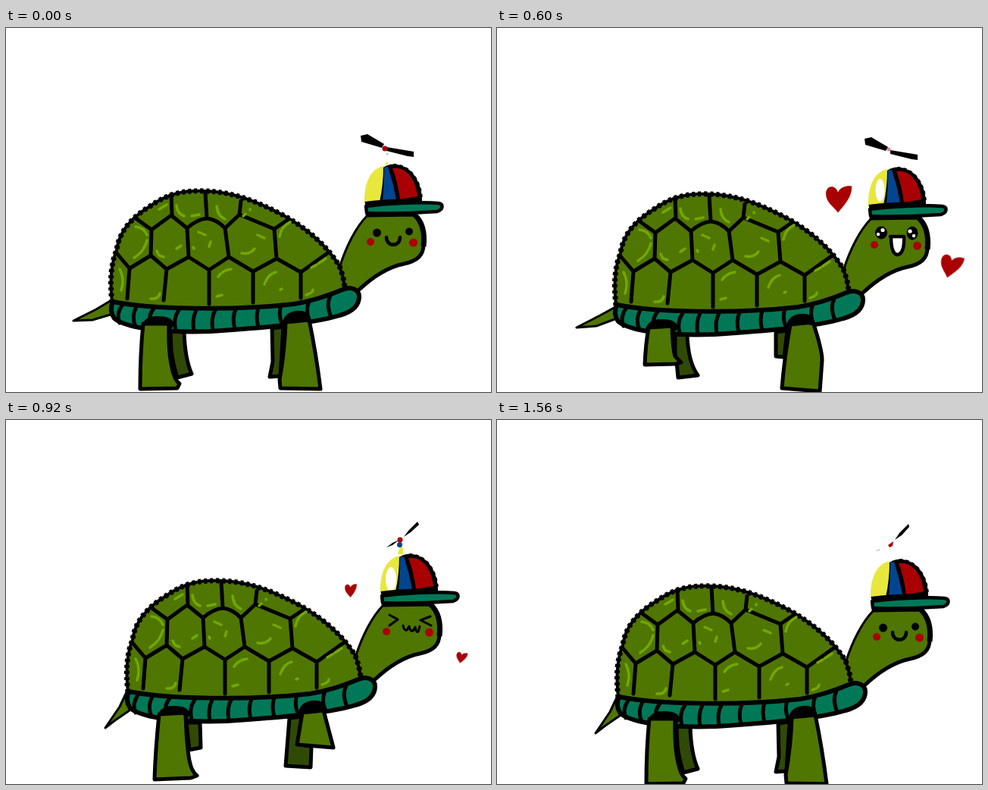
Animation of 640 by 480 pixels, one loop 1600 ms. Source, as an HTML page:

```html
<!DOCTYPE html>
<html lang="en">
<head>
<meta charset="utf-8">
<title>Walking turtle</title>
<style>
  html, body { margin: 0; width: 100%; height: 100%; overflow: hidden; background: #fff; }
  svg { display: block; width: 640px; height: 480px; }

  .skin { fill: #4f7600; }
  .far { fill: #304a06; }
  .teal { fill: #007857; }
  .yellow { fill: #e7e73c; }
  .blue { fill: #004590; }
  .red { fill: #a90004; }
  .white { fill: #fff; }
  .ink { stroke: #000; stroke-width: 5; stroke-linejoin: round; stroke-linecap: round; }
  .thin { stroke-width: 3; }
  .line { fill: none; }
  .jag { fill: none; stroke: #000; stroke-width: 7; stroke-dasharray: 4 4; }
  .shine { fill: none; stroke: #73a800; stroke-width: 3.5; stroke-linecap: round; stroke-linejoin: round; }

  /* Held poses: every part jumps, nothing eases */
  .body, .rest, .lift, .stride, .first, .glance, .wince, .last, .happy, .flat, .across, .stem {
    animation: 1600ms step-end infinite;
  }
  .rest, .lift, .stride, .first, .glance, .wince, .last, .flat, .across { visibility: hidden; }

  .body { animation-name: walk; }
  .rest { animation-name: rest; }
  .lift { animation-name: lift; }
  .stride { animation-name: stride; }
  .first { animation-name: first; }
  .glance { animation-name: glance; }
  .wince { animation-name: wince; }
  .last { animation-name: last; }
  .flat { animation-name: flat; }
  .across { animation-name: across; }

  @keyframes walk {
    0%, 100% { transform: translate(0, 0); }
    17.5% { transform: translate(8px, -1px); }
    37.5% { transform: translate(17px, 4px); }
    57.5% { transform: translate(21px, -3px); }
    77.5% { transform: translate(17px, 3px); }
    97.5% { transform: translate(20px, 4px); }
  }
  @keyframes rest { 0%, 97.5%, 100% { visibility: visible; } 17.5% { visibility: hidden; } }
  @keyframes lift { 0%, 37.5%, 77.5%, 100% { visibility: hidden; } 17.5%, 57.5% { visibility: visible; } }
  @keyframes stride { 0%, 57.5%, 97.5%, 100% { visibility: hidden; } 37.5%, 77.5% { visibility: visible; } }
  @keyframes first { 0% { visibility: visible; } 17.5%, 100% { visibility: hidden; } }
  @keyframes glance { 0%, 37.5%, 100% { visibility: hidden; } 17.5% { visibility: visible; } }
  @keyframes wince { 0%, 77.5%, 100% { visibility: hidden; } 57.5% { visibility: visible; } }
  @keyframes last { 0%, 100% { visibility: hidden; } 97.5% { visibility: visible; } }
  @keyframes flat { 0%, 37.5%, 77.5% { visibility: visible; } 17.5%, 57.5%, 97.5%, 100% { visibility: hidden; } }
  @keyframes across { 0%, 37.5%, 77.5%, 100% { visibility: hidden; } 17.5%, 57.5%, 97.5% { visibility: visible; } }
</style>
</head>
<body>
<svg viewBox="0 0 640 480">
  <defs>
    <path id="heart" d="M-1 18C-7 10-17 4-17-7C-17-18-5-20-1-9C3-17 12-18 17-17C18-4 9 6-1 18Z"/>
    <path id="shell" d="M140 362C137 335 138 312 146 293C149 268 167 249 190 235C214 218 235 214 262 215C300 216 332 229 366 247C402 267 427 292 440 314C444 325 447 335 447 347"/>
  </defs>

  <g class="body">
    <!-- Tail -->
    <path class="first skin ink thin" d="M139 359L119 371L89 386L114 385L141 377Z"/>
    <path class="stride skin ink thin" d="M139 364L119 375L88 391L114 389L141 379Z"/>
    <g class="across"><path class="skin ink thin" d="M139 360L129 381L110 409L123 399L142 386Z"/></g>

    <!-- Far legs -->
    <g class="rest far ink">
      <path d="M217 400L235 400Q236 436 245 456L226 461Q220 442 218 425Z"/>
      <path d="M351 396L366 394L362 459L348 460L352 440Z"/>
    </g>
    <g class="lift far ink">
      <path d="M217 402L235 402L236 435L221 438Z"/>
      <path d="M353 396L371 394L372 432L382 433L381 461L348 459Z"/>
    </g>
    <g class="stride far ink">
      <path d="M218 400L234 400Q235 436 248 454L222 457Q221 442 218 425Z"/>
      <path d="M351 397L366 395L362 430L351 429Z"/>
    </g>

    <!-- Neck and head -->
    <path class="skin" d="M441 313C449 288 462 262 477 247L540 246C549 255 553 270 551 285C551 300 543 307 525 311C505 315 485 327 465 346L446 347Z"/>
    <path class="ink line thin" d="M441 313C449 288 462 262 477 247"/>
    <path class="ink line" d="M477 247L540 246C549 255 553 270 551 285C551 300 543 307 525 311C505 315 485 327 465 346"/>
    <path class="line" stroke="#000" stroke-width="7" d="M539 246C549 255 553 270 551 288"/>

    <!-- Shell -->
    <use href="#shell" class="skin"/>
    <path class="skin" d="M140 361L447 346Q410 370 268 371Q180 370 140 361Z"/>
    <use href="#shell" class="ink line" style="stroke-width:4"/>
    <use href="#shell" class="jag"/>
    <path class="ink line" d="M218 219L219 247M263 217L265 251M310 228L308 246
      M170 250L192 266L218 247L239 264Q252 252 266 251Q279 253 289 264L308 246L354 265L373 252
      M192 266L191 300M239 264L241 302M289 264L294 302M354 265L357 304
      M146 297L163 317L191 300L212 318L241 302L268 319L294 302L326 321L357 304L389 322L424 297
      M163 317L160 357M212 318L208 359M268 319L268 364M326 321L326 362M389 322L389 356"/>
    <path class="shine" d="M171 262Q182 263 186 273M186 280Q183 294 169 303M150 318Q157 331 152 346M191 357Q201 358 203 350
      M212 233L202 239M225 234Q226 245 235 248M245 248L255 246M278 235Q279 248 289 252M313 248L316 245M322 239L322 240
      M375 256Q363 262 361 275M254 269L263 273M270 282L268 288M231 287L225 291M199 294L202 300L208 302
      M247 289L248 291M280 328Q286 319 297 318M278 354L285 352M311 297Q322 299 328 291
      M396 352Q405 349 405 345M403 316L410 312M413 310L422 304M332 273L341 277M362 345L364 344"/>
    <path class="shine" stroke-width="5" d="M341 338Q346 324 356 322"/>

    <!-- Rim -->
    <path class="teal ink" style="stroke-width:6" d="M141 361C190 371 300 373 380 364C410 359 430 351 444 345C455 340 466 345 466 354C466 368 455 375 440 379C400 391 330 396 270 400C215 402 160 397 143 383C138 376 138 368 141 361Z"/>
    <path class="ink line" d="M153 366Q145 377 150 389M172 368Q165 380 171 394M195 370Q188 378 190 388M228 372Q220 383 224 399
      M251 372Q245 384 248 400M276 372Q270 383 273 399M303 371Q298 382 302 397M333 369Q329 381 333 394M363 366Q359 377 364 390
      M400 361Q395 370 400 386M428 353Q422 365 429 381"/>

    <!-- Near legs -->
    <g class="rest skin ink">
      <path d="M181 390L215 390Q214 428 219 448Q222 464 229 469L226 475L177 476Q177 430 181 390Z"/>
      <path d="M369 388L400 385Q409 428 415 476L362 475L361 464Q368 425 369 388Z"/>
    </g>
    <g class="lift skin ink">
      <path d="M181 391L216 389Q217 430 221 452Q224 467 231 472L223 475L175 477Q176 440 181 391Z"/>
      <path d="M370 389L398 386L411 435L363 431Z"/>
    </g>
    <g class="stride skin ink">
      <path d="M183 391L214 389Q215 420 218 429L226 437L218 439L178 440Q179 414 183 391Z"/>
      <path d="M370 387L400 384Q412 420 412 434L409 475L359 471Q362 432 370 387Z"/>
    </g>
    <path d="M178 396Q181 380 199 380Q219 379 222 391L218 397L211 391Q198 387 185 391Z"/>
    <path d="M364 392Q366 375 383 373Q401 371 403 387L397 388Q384 383 371 389Z"/>

    <!-- Face -->
    <g class="red"><circle cx="481" cy="282" r="5"/><circle cx="537.5" cy="283" r="5.5"/></g>
    <g class="rest">
      <circle cx="489.500" cy="270" r="5.500"/><circle cx="532" cy="268.500" r="5"/>
      <path class="ink line" style="stroke-width:4.500" d="M502 276C502 289 520 289 520 276"/>
    </g>
    <g class="glance">
      <ellipse cx="489.500" cy="266" rx="6" ry="9"/><ellipse cx="532" cy="266" rx="6" ry="8"/>
      <path d="M500 275Q501 269 511 270Q522 269 522 274Q522 288 511 288Q502 287 500 275Z"/>
      <g class="white">
        <circle cx="491" cy="263" r="2.500"/><circle cx="488" cy="270" r="2"/>
        <circle cx="530" cy="263" r="2.500"/><circle cx="533" cy="269" r="2"/>
        <path d="M505 275L517 274Q517 283 511 283Q505 282 505 275Z"/>
      </g>
    </g>
    <g class="stride">
      <ellipse cx="490" cy="266" rx="8" ry="8.500"/><ellipse cx="531" cy="266.500" rx="7.500" ry="9"/>
      <path class="white ink" style="stroke-width:4.500" d="M502 271L520 271Q521 294 511 295Q503 293 503 272Z"/>
      <g class="white">
        <circle cx="492" cy="262.500" r="2.600"/><circle cx="486" cy="268" r="2.200"/>
        <circle cx="528" cy="264" r="2.600"/><circle cx="533" cy="270" r="2.200"/>
      </g>
    </g>
    <path class="wince ink line thin" d="M485 260L496 266L485 274M539 262L526 267L540 274
      M503 274Q504 281 508 280L511 275Q512 282 516 281L519 276Q520 284 523 282L525 275"/>

    <!-- Cap -->
    <path d="M474 231L490 192Q497 182 507 180C532 177 549 200 549 228L514 232Z"/>
    <path class="line" stroke="#000" stroke-width="6" stroke-dasharray="4 4" d="M511 182C531 181 546 202 547 226"/>
    <path class="yellow" d="M473 231C472 204 481 186 498 182Q498 207 493 229Z"/>
    <path class="blue" d="M499 184L504 183Q511 204 515 226L497 228Q499 207 499 184Z"/>
    <path class="red" d="M510 185C528 182 541 200 543 222L520 226Q517 203 510 185Z"/>
    <path class="glance white" d="M484 229Q483 203 490 190Q496 186 494 199Q494 214 489 229Z"/>
    <ellipse class="stride white" cx="488.500" cy="210" rx="6" ry="15"/>
    <ellipse class="wince white" cx="487" cy="213" rx="7" ry="16"/>
    <path class="teal ink" style="stroke-width:4.500" d="M475 235C500 232 545 229 570 231C578 232 577 239 569 242C540 244 500 245 476 244Z"/>
    <path class="line" stroke="#000" stroke-width="6" d="M474 232Q510 227 548 229"/>

    <!-- Propeller -->
    <g class="flat">
      <path d="M468 142L477 140L499 153L496 158L469 150Z"/>
      <path d="M502 157L538 163L538 170L530 169L502 162Z"/>
    </g>
    <g class="first">
      <circle class="red" cx="500" cy="159" r="3.500"/>
      <circle cx="503" cy="166" r="1.500" fill="#9fd0e0"/>
      <path class="yellow" d="M500 180L503 176L505 180Z"/>
    </g>
    <g class="stride">
      <circle cx="500" cy="156" r="2.500" fill="#d98a94"/>
    </g>
    <g class="lift">
      <path d="M504 157L510 149L522 137L524 141L513 151Z"/>
      <path d="M481 171L489 165L498 161L489 168Z"/>
      <path class="yellow" d="M496 180L499 170L502 170L504 180Z"/>
      <circle class="blue" cx="498.500" cy="167.500" r="3.500"/>
      <circle class="red" cx="499" cy="161" r="3.500"/>
    </g>
    <g class="last">
      <path d="M505 154L511 145L523 133L524 137L514 148Z"/>
      <path d="M479 169L486 166L484 168Z" fill="#999"/>
      <path class="red" d="M496 161L503 156L502 162L498 164Z"/>
    </g>
  </g>

  <!-- Hearts -->
  <g class="red">
    <g class="glance">
      <use href="#heart" transform="translate(442 226.500) scale(.46 .54)"/>
      <use href="#heart" transform="translate(587 315.500) rotate(12) scale(.42)"/>
    </g>
    <g class="stride">
      <use href="#heart" transform="translate(451 225.500)"/>
      <use href="#heart" transform="translate(599 314.500) rotate(15) scale(.86)"/>
    </g>
    <g class="wince">
      <use href="#heart" transform="translate(455 225) scale(.46 .5)"/>
      <use href="#heart" transform="translate(601 313.500) rotate(12) scale(.42)"/>
    </g>
  </g>
</svg>
</body>
</html>
```
